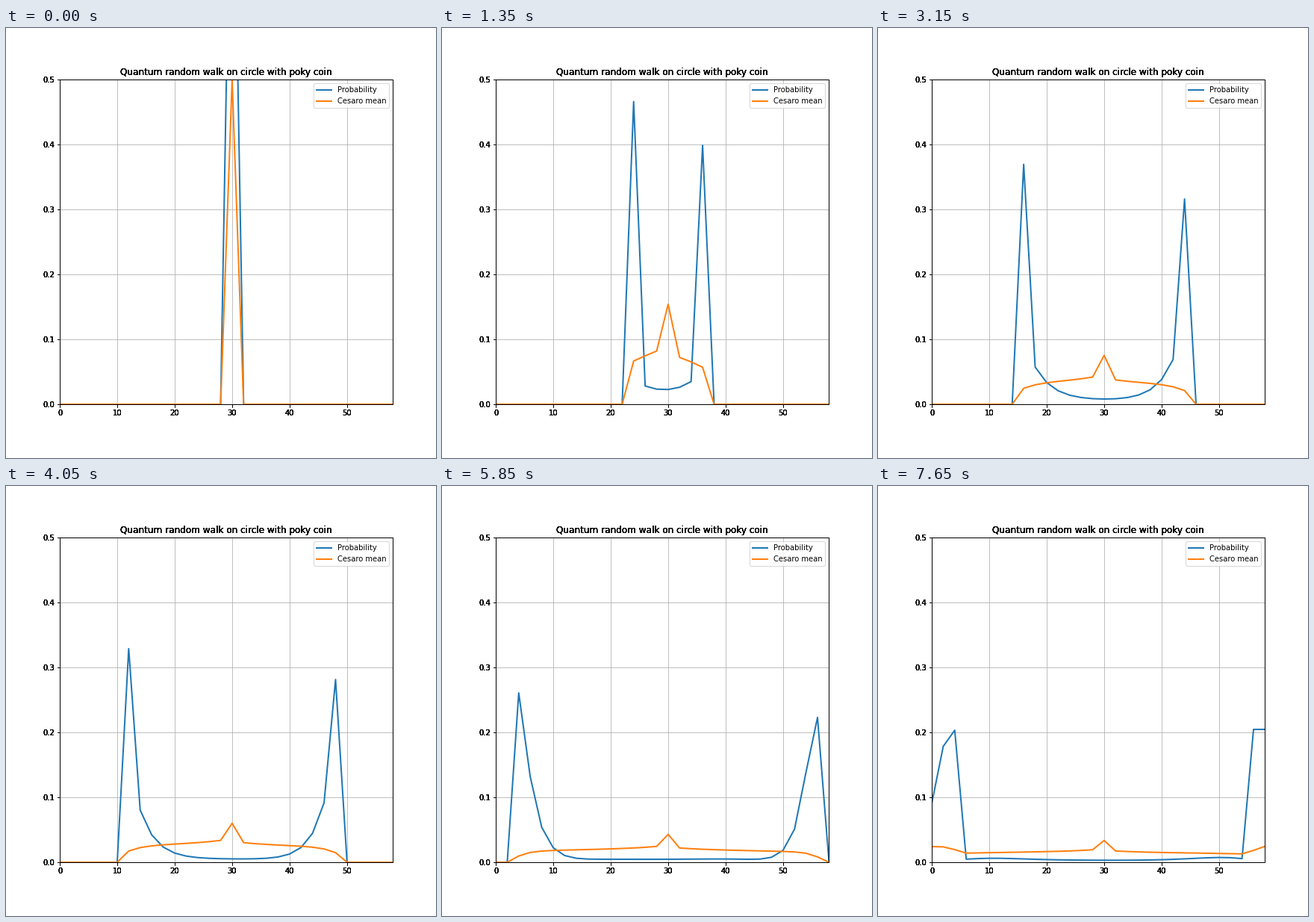
These frames come from a looping animation (576x576 px, 8000 ms). A matplotlib script:

```python
import numpy as np
import matplotlib.pyplot as plt
from matplotlib.animation import FuncAnimation

SITES = 60
START = 30
STEPS = 36
THETA = 0.17      # coin angle
PHASE = 1.335     # phase between the two initial coin states
FLUX = -2.54      # phase picked up on one trip round the circle
TICK = 50         # ms per frame
HOLD = 9          # frames per picture
FRAMES = 160


def walk():
    """Probability of every site after 0, 1, 2, ... steps."""
    c, s = np.cos(THETA), np.sin(THETA)
    z = np.exp(1j * FLUX)
    left = np.zeros(SITES, complex)
    right = np.zeros(SITES, complex)
    left[START] = np.sqrt(0.5)
    right[START] = np.sqrt(0.5) * np.exp(1j * PHASE)
    rows = []
    for _ in range(STEPS):
        rows.append(abs(left) ** 2 + abs(right) ** 2)
        left, right = c * left + s * right, c * right - s * left
        left, right = np.roll(left, -1), np.roll(right, 1)
        left[-1] *= z.conjugate()
        right[0] *= z
    return np.array(rows)


def style(ax):
    ax.set_xlim(0, 58)
    ax.set_ylim(0, 0.5)
    ax.set_title("Quantum random walk on circle with poky coin", fontsize=12)


prob = walk()
total = np.cumsum(prob, axis=0)
x = np.arange(0, SITES, 2)

plt.rcParams.update({"font.family": "DejaVu Sans", "font.size": 10})
fig = plt.figure(figsize=(8, 8), dpi=72)
box = [0.125, 0.125, 0.775, 0.755]
ax = fig.add_axes(box)
style(ax)
ax.grid(True)
prob_line, = ax.plot([], [], lw=2, label="Probability")
mean_line, = ax.plot([], [], lw=2, label="Cesaro mean")
ax.legend(loc="upper right")

# Stacked empty axes give the heavy lettering and frame.
for _ in range(4):
    layer = fig.add_axes(box)
    layer.patch.set_visible(False)
    style(layer)


def update(i):
    t = 2 * (i // HOLD)
    prob_line.set_data(x, prob[t, ::2])
    mean_line.set_data(x, total[t, ::2] / max(t + 1, 2))
    return prob_line, mean_line


anim = FuncAnimation(fig, update, frames=FRAMES, interval=TICK,
                     repeat=True, repeat_delay=0)
plt.show()
```
